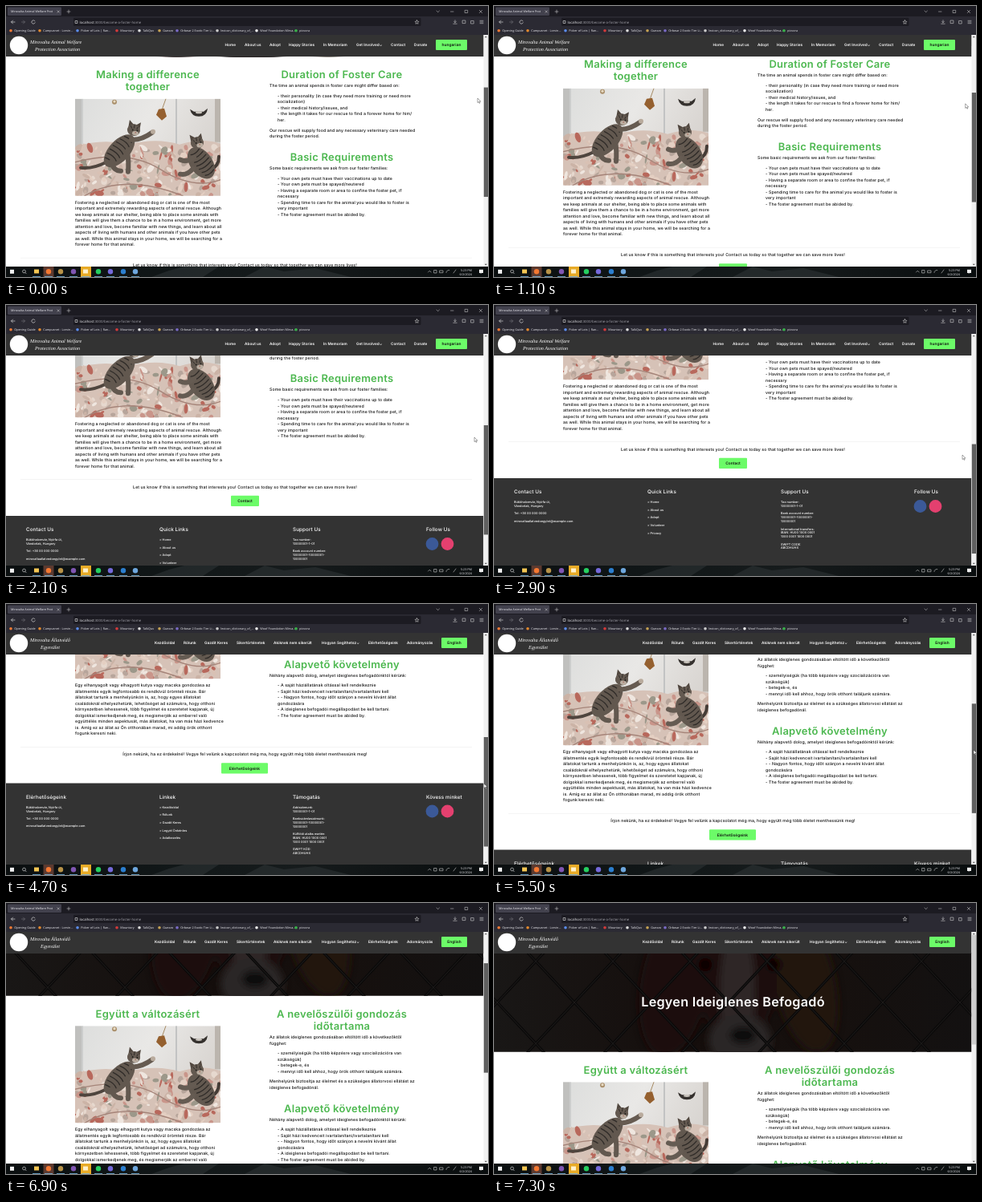
An HTML page for the animation above (7600 ms loop, 600 by 338 pixels).

```html
<!DOCTYPE html>
<html lang="en">
<head>
<meta charset="utf-8">
<title>Foster home page</title>
<style>
html, body { margin: 0; width: 100%; height: 100%; overflow: hidden; background: #fff; }
svg { display: block; width: 100vw; height: 100vh; }
text { font-family: Inter, "Open Sans", sans-serif; font-size: 5.2px; font-weight: 500; letter-spacing: .018em; fill: #111; text-rendering: geometricPrecision; white-space: pre; }
.head { font-size: 13px; font-weight: 600; letter-spacing: .018em; fill: #4db850; }
.title { font-size: 16.2px; font-weight: 600; letter-spacing: .016em; fill: #fff; }
.nav { font-size: 4.7px; font-weight: 600; letter-spacing: .005em; fill: #fff; }
.label { font-size: 4.8px; font-weight: 600; letter-spacing: .01em; }
.foot { font-size: 6.3px; fill: #fff; letter-spacing: .015em; }
.small { font-size: 3.85px; fill: #fff; letter-spacing: 0; }
.brand { font: italic 6.2px "Liberation Serif", serif; letter-spacing: 0; fill: #fff; }
.ui { font: 3.75px "Open Sans", sans-serif; letter-spacing: 0; fill: #f0f0f4; }
.url { font-size: 4.3px; }
.mid { text-anchor: middle; }
.end { text-anchor: end; }
</style>
</head>
<body>
<svg id="stage" viewBox="0 0 600 338" preserveAspectRatio="none"></svg>
<script>
const LOOP = 7600, STEP = 100;
const BUTTON = "#6cfb68";

const rect = (x, y, w, h, fill, more = "") => `<rect x="${x}" y="${y}" width="${w}" height="${h}" fill="${fill}" ${more}/>`;
const disc = (x, y, r, fill, more = "") => `<circle cx="${x}" cy="${y}" r="${r}" fill="${fill}" ${more}/>`;
const oval = (x, y, rx, ry, fill, turn = 0) =>
  `<ellipse rx="${rx}" ry="${ry}" fill="${fill}" transform="translate(${x} ${y}) rotate(${turn})"/>`;
const line = (d, color, width = .6) =>
  `<path d="${d}" fill="none" stroke="${color}" stroke-width="${width}" stroke-linecap="round"/>`;
const text = (x, y, s, cls = "") => `<text x="${x}" y="${y}" class="${cls}">${s.replace(/>/g, "&gt;")}</text>`;
const lines = (x, y, rows, cls = "", pitch = 7.5) =>
  rows.split("\n").map((s, i) => text(x, y + i * pitch, s, cls)).join("");

function randomizer(seed) {
  return () => (seed = (seed * 16807) % 2147483647) / 2147483647;
}

const english = {
  nav: [[272.5, "Home"], [297, "About us"], [328, "Adopt"], [352, "Happy Stories"], [395, "In Memoriam"],
    [436, "Get Involved⌄"], [479, "Contact"], [508, "Donate"]],
  brand: [[30, "Mirovalta Animal Welfare"], [36, "Protection Association"]],
  toggle: [535, "hungarian"],
  title: "Become a Foster Home",
  photoTop: 238.3,
  endTop: 436.5,
  leftHead: "Making a difference\ntogether",
  story: `Fostering a neglected or abandoned dog or cat is one of the most
important and extremely rewarding aspects of animal rescue. Although
we keep animals at our shelter, being able to place some animals with
families will give them a chance to be in a home environment, get more
attention and love, become familiar with new things, and learn about all
aspects of living with humans and other animals if you have other pets
as well. While this animal stays in your home, we will be searching for a
forever home for that animal.`,
  rightHead: "Duration of Foster Care",
  secondHead: [315.4, "Basic Requirements"],
  right: [[328, 223.9, "The time an animal spends in foster care might differ based on:"],
    [338, 236.4, `- their personality (in case they need more training or need more
socialization)
- their medical history/issues, and
- the length it takes for our rescue to find a forever home for him/
her.`],
    [328, 279.4, "Our rescue will supply food and any necessary veterinary care needed\nduring the foster period."],
    [328, 326.4, "Some basic requirements we ask from our foster families:"],
    [338, 339.2, `- Your own pets must have their vaccinations up to date
- Your own pets must be spayed/neutered
- Having a separate room or area to confine the foster pet, if
necessary
- Spending time to care for the animal you would like to foster is
very important
- The foster agreement must be abided by.`]],
  call: "Let us know if this is something that interests you! Contact us today so that together we can save more lives!",
  button: [280, 35, "Contact"],
  foot: ["Contact Us", "Quick Links", "Support Us", "Follow Us"],
  links: ["Home", "About us", "Adopt", "Volunteer", "Privacy"],
  support: ["Tax number:", "Bank account number:", "International transfers:", "SWIFT CODE:"]
};

const hungarian = {
  nav: [[185, "Kezdőoldal"], [221, "Rólunk"], [247, "Gazdit Keres"], [287, "Sikertörténetek"],
    [333, "Akiknek nem sikerült"], [393, "Hogyan Segíthetsz⌄"], [451, "Elérhetőségeink"], [499, "Adományozás"]],
  brand: [[30, "Mirovalta Állatvédő"], [43, "Egyesület"]],
  toggle: [542, "English"],
  title: "Legyen Ideiglenes Befogadó",
  photoTop: 223.3,
  endTop: 429,
  leftHead: "Együtt a változásért",
  story: `Egy elhanyagolt vagy elhagyott kutya vagy macska gondozása az
állatmentés egyik legfontosabb és rendkívül örömteli része. Bár
állatokat tartunk a menhelyünkön is, az, hogy egyes állatokat
családoknál elhelyezhetünk, lehetőséget ad számukra, hogy otthoni
környezetben lehessenek, több figyelmet és szeretetet kapjanak, új
dolgokkal ismerkedjenek meg, és megismerjék az emberrel való
együttélés minden aspektusát, más állatokat, ha van más házi kedvence
is. Amíg ez az állat az Ön otthonában marad, mi addig örök otthont
fogunk keresni neki.`,
  rightHead: "A nevelőszülői gondozás\nidőtartama",
  secondHead: [331, "Alapvető követelmény"],
  right: [[328, 239, "Az állatok ideiglenes gondozásában eltöltött idő a következőktől\nfügghet:"],
    [338, 259, `- személyiségük (ha több képzésre vagy szocializációra van
szükségük)
- betegek-e, és
- mennyi idő kell ahhoz, hogy örök otthont találjunk számára.`],
    [328, 294.3, "Menhelyünk biztosítja az élelmet és a szükséges állatorvosi ellátást az\nideiglenes befogadónál."],
    [328, 341.5, "Néhány alapvető dolog, amelyet ideiglenes befogadóinktól kérünk:"],
    [338, 354, `- A saját háziállatának oltással kell rendelkeznie
- Saját házi kedvenceit ivartalanítani/ivartalanítani kell
- - Nagyon fontos, hogy időt szánjon a nevelni kívánt állat
gondozására
- A ideiglenes befogadói megállapodást be kell tartani.
- The foster agreement must be abided by.`]],
  call: "Írjon nekünk, ha ez érdekelné! Vegye fel velünk a kapcsolatot még ma, hogy együtt még több életet menthessünk meg!",
  button: [268, 58, "Elérhetőségeink"],
  foot: ["Elérhetőségeink", "Linkek", "Támogatás", "Kövess minket"],
  links: ["Kezdőoldal", "Rólunk", "Gazdit Keres", "Legyél Önkéntes", "Adatkezelés"],
  support: ["Adószámunk:", "Bankszámlaszámunk:", "Külföldi utalás esetén:", "SWIFT KÓD:"]
};

function tabby(x, y, turn, rx, ry) {
  let stripes = "";
  for (let k = -3; k <= 3; k++) {
    const sx = k * rx / 4.2, sy = ry * Math.sqrt(1 - (sx / rx) ** 2) * .8;
    stripes += line(`M${sx} ${-sy}Q${sx + 3} 0 ${sx} ${sy * .6}`, "#2f2b28", 1.3);
  }
  return `<g transform="translate(${x} ${y}) rotate(${turn})">${oval(0, 0, rx, ry, "#62584f")}${stripes}</g>`;
}

function catHead(x, y, turn) {
  return `<g transform="translate(${x} ${y}) rotate(${turn}) scale(.9)">
    <path d="M-8 -3L-8 -13L-2 -8L3 -8L8 -12L8 -2Z" fill="#51473f"/>${oval(0, 0, 9, 8, "#635950")}
    ${oval(3, 4, 4.5, 3, "#b9ada0")}${line("M-5 -5L-3 -2M0 -7L0 -3M5 -5L4 -2", "#2f2b28", 1)}
    ${disc(-1.5, 0, 1.1, "#24221e")}${disc(5, 0, 1.1, "#24221e")}${disc(3, 3, .9, "#a66d60")}</g>`;
}

function photo(y) {
  const rnd = randomizer(41);
  const tones = ["#c9958a", "#e6d8ce", "#cbb3a6", "#efe6df", "#b8685c", "#9c988a", "#d9c1b4", "#b7a59b", "#e4cfc2"];
  let quilt = "";
  for (let i = 0; i < 230; i++) {
    const px = rnd() * 185, py = 60 + rnd() * 62;
    quilt += oval(px, py, 1.5 + rnd() * 5, 1 + rnd() * 3, tones[Math.floor(rnd() * tones.length)], rnd() * 180);
  }
  return `<svg x="86" y="${y}" width="181" height="121" viewBox="0 0 181 121">
    ${rect(0, 0, 181, 121, "url(#wall)")}
    ${rect(0, 0, 8, 62, "#c0c0be")}${rect(125, 0, 2, 60, "#c2c3c3")}${line("M9 0V56", "#b9bbbb", 1)}
    ${disc(49, 4, 3, "#a98e69")}${disc(49, 3.4, 1.6, "#e6dac3")}
    ${line("M113 0L108 14", "#a58a63", 1)}<path d="M104 13L111 12L114 22L108 27L101 20Z" fill="#95602f"/>
    <path d="M143 13L148 16H160L165 12Q164 22 154 22Q145 22 143 13Z" fill="#35312e"/>${oval(154, 17, 4, 1.6, "#c9c4bd")}
    ${rect(174, 0, 7, 54, "#bbb5ae")}
    <path d="M0 60Q34 49 65 57Q102 48 130 57Q158 48 181 56V121H0Z" fill="#d6c2b7"/>${quilt}
    ${line("M0 79Q65 62 106 88T181 101M12 121Q61 92 134 121", "#a58479", 1.4)}
    ${line("M39 79Q21 88 7 86", "#4f453e", 4)}
    ${tabby(55, 65, -48, 25, 13)}${line("M45 79Q48 90 57 90M65 65Q67 80 66 91", "#62584f", 6)}
    ${line("M70 51Q82 52 96 42", "#665b51", 6)}${disc(97, 41, 3, "#b9ab9d")}${catHead(73, 39, 10)}
    ${line("M169 88Q179 84 179 72", "#453c36", 4)}
    ${tabby(157, 80, 55, 22, 14)}${line("M148 73Q139 80 131 76M147 87Q139 96 131 94", "#655b52", 6)}
    ${catHead(152, 55, -12)}
  </svg>`;
}

function hero(title) {
  let wire = "";
  for (let x = -150; x < 640; x += 96) wire += `M${x} 186L${x + 116} 62M${x} 62L${x + 116} 186`;
  return `<svg x="0" y="62" width="594.5" height="123.7" viewBox="0 62 594.5 123.7">
    ${rect(0, 62, 595, 124, "url(#heroTone)")}
    <g filter="url(#soft)">
      ${oval(225, 100, 42, 92, "#1f110d", 10)}${oval(387, 100, 38, 88, "#20120e", -12)}
      ${oval(302, 92, 50, 80, "#1b100d")}${oval(303, 112, 22, 84, "#2e2826")}${oval(306, 171, 39, 32, "#2c2725")}
      ${oval(310, 165, 17, 11, "#0c0a0a")}${disc(263, 77, 9, "#080606")}${disc(348, 77, 9, "#080606")}
    </g>
    ${line(wire, "#0b0a0a", 3.5)}${line(wire, "#211f1e", .9)}</svg>${text(297.5, 128.5, title, "title mid")}`;
}

function footer(p, top) {
  const xs = [25, 191, 357, 523];
  const small = (x, y, rows) => lines(x, top + y, rows, "small", 4.8);
  const [tax, bank, abroad, swift] = p.support;
  return rect(0, top, 594.5, 240, "#333") +
    xs.map((x, i) => text(x, top + 19.2, p.foot[i], "foot")).join("") +
    small(25, 31.2, "Bükkhalomvár, Nyírfa út,\nVándorlak, Hungary") + small(25, 45.4, "Tel: +36 00 000 0000") +
    small(25, 54.7, "mirovaltaallatvedoegylet@example.com") +
    p.links.map((s, i) => small(191, 31.2 + i * 9.6, "> " + s)).join("") +
    small(357, 31.2, tax + "\n10000001-1-01") + small(357, 45.4, bank + "\n10000001-10000001-\n10000001") +
    small(357, 64.6, abroad + "\nIBAN: HU00 1000 0001\n1000 0001 1000 0001") +
    small(357, 83.6, swift + "\nABCDHUHX") +
    disc(530.5, top + 35, 7.9, "#3b5998") + disc(549.5, top + 35, 7.9, "#e4406f");
}

function page(p) {
  const [bx, bw, label] = p.button, end = p.endTop;
  return hero(p.title) + lines(176.5, 212.7, p.leftHead, "head mid", 15) + photo(p.photoTop) +
    lines(86, p.photoTop + 131, p.story) + lines(418, 212.7, p.rightHead, "head mid", 15) +
    text(418, p.secondHead[0], p.secondHead[1], "head mid") +
    p.right.map(([x, y, rows]) => lines(x, y, rows)).join("") +
    rect(18, end, 562, .4, "#e4e4e4") + text(297.5, end + 11.1, p.call, "mid") +
    rect(bx, end + 20.3, bw, 13.3, BUTTON, 'rx="1"') + text(bx + bw / 2, end + 28.7, label, "label mid") +
    footer(p, end + 45.5);
}

function navBar(p) {
  const [x, label] = p.toggle;
  return p.nav.map(([nx, s]) => text(nx, 50.2, s, "nav")).join("") +
    p.brand.map(([nx, s], i) => text(nx, 47 + i * 9, s, "brand")).join("") +
    rect(x, 42, 574 - x, 13, BUTTON, 'rx="1"') + text((x + 574) / 2, 50.2, label, "label mid");
}

function browserTop() {
  const marks = [[5, "Opening Guide", "#f47b35"], [41, "Campusnet - Lorvin…", "#e58a2c"],
    [88, "Picker of Lots | Ran…", "#5b8def"], [137, "Mountory", "#d63a3a"], [165, "TalkQuv", "#ddd"],
    [190, "Guezzo", "#c5a253"], [212, "Orbwar 2 Exotic Tier Li…", "#7b6bc9"], [262, "lexicon_dictionary_of_…", "#ccc"],
    [311, "Woof Foundation Mirva…", "#eee"], [360, "picvora", "#39b54a"]];
  return rect(0, 0, 600, 13, "#1c1b22") + rect(0, 13, 600, 23, "#2b2a33") +
    rect(2, 1.5, 67, 10.5, "#42414d", 'rx="1.3"') + text(6, 8.2, "Mirovalta Animal Welfare Prot", "ui") +
    line("M64 5.8l2.4 2.4m0 -2.4l-2.4 2.4M76 7h4M78 5v4M536 6l1.7 1.7l1.7 -1.7M553.5 7h3.5M589.3 5.3l3.3 3.3m0 -3.3l-3.3 3.3M571.5 5.3h3.2v3.2h-3.2z", "#ddd", .5) +
    rect(84, 14.7, 432.5, 10.4, "#1c1b22", 'rx="1.3"') +
    `<text x="91.5" y="21.6" class="ui url">localhost:<tspan fill="#a5a5ad">3000/become-a-foster-home</tspan></text>` +
    line("M11 20H6.5l2 -2m-2 2l2 2M36 18.8a2.2 2.2 0 1 0 .2 2M86.5 18.5h2.4v3h-2.4z", "#eee", .6) +
    line("M19.5 20h4l-2 -2m2 2l-2 2", "#77767f", .6) +
    line("M511.5 17.7l.7 1.5l1.7 .2l-1.2 1.2l.3 1.7l-1.5 -.8l-1.5 .8l.3 -1.7l-1.2 -1.2l1.7 -.2zM559 17.7v3l-1.4 -1.3m1.4 1.3l1.4 -1.3M556.8 22.2h4.4M568.5 18h3.4v3.6h-3.4zM579 18.5h3.2v3.5h-3.2zM590 18.3h4M590 20h4M590 21.7h4", "#ddd", .55) +
    marks.map(([x, s, c]) => disc(x + 1, 30.7, 1.8, c) + text(x + 5.3, 32.1, s, "ui")).join("");
}

function taskbar() {
  const icons = [[38, "#f3c653"], [53, "#f47832"], [68, "#b89348"], [84, "#8056b3"], [99, "#f2b72f"],
    [115, "#25cf60"], [130, "#7569db"], [146, "#2b7fd0"], [161, "#6ea7de"]];
  return rect(0, 325, 600, 13, "url(#barTone)") +
    `<path d="M181 338L203 330L222 325H265L245 338ZM322 325L346 331L385 327L429 338H297Z" fill="#33393a" opacity=".5"/>` +
    rect(5, 328.8, 5, 5, "#f0f0f0") + disc(22.5, 331, 1.9, "none", 'stroke="#eee" stroke-width=".6"') +
    line("M24 332.6l1.2 1.2", "#eee") + rect(46.5, 325, 13, 13, "#5c3a30") + rect(93, 325, 13, 13, "#e8ab27") +
    icons.map(([x, c], i) => (i === 0 || i === 4 ? rect(x - 3, 328.5, 6, 5, i ? "#fff1cc" : c) : disc(x, 331.2, 3.2, c)) +
      rect(x - 5, 337, 10, .8, "#78b8e3")).join("") +
    line("M525.5 332l1.8 -1.8l1.8 1.8M533 329.5h3v3.5h-3zM540 330h4v2.7h-4zM548 332.5a3 3 0 0 1 3.8 -3M557 333l3 -4", "#ddd", .55) +
    `<path d="M589 328.8h5v4.2h-2.2l-1 1.2v-1.2h-1.8z" fill="#eee"/>` +
    text(580, 330.5, "5:23 PM", "ui end") + text(580, 336.2, "6/2/2024", "ui end");
}

const stage = document.getElementById("stage");
stage.innerHTML = `
  <defs>
    <linearGradient id="wall" x2="1" y2=".4"><stop stop-color="#dcdddc"/><stop offset=".5" stop-color="#e9e8e6"/><stop offset="1" stop-color="#d7d3cf"/></linearGradient>
    <linearGradient id="heroTone"><stop stop-color="#191716"/><stop offset=".4" stop-color="#150e0c"/><stop offset=".7" stop-color="#16100e"/><stop offset="1" stop-color="#131111"/></linearGradient>
    <linearGradient id="barTone"><stop stop-color="#0b0f10"/><stop offset=".35" stop-color="#111718"/><stop offset=".6" stop-color="#161b1c"/><stop offset="1" stop-color="#090d0e"/></linearGradient>
    <filter id="soft"><feGaussianBlur stdDeviation="5"/></filter>
    <clipPath id="view"><rect y="36" width="594.5" height="289"/></clipPath>
  </defs>
  ${rect(0, 0, 600, 338, "#fff")}
  <g clip-path="url(#view)"><g id="scroller"><g id="enPage">${page(english)}</g><g id="huPage">${page(hungarian)}</g></g></g>
  ${rect(0, 36, 594.5, 27, "#333")}${disc(16, 49, 11.2, "#fff")}
  <g id="enNav">${navBar(english)}</g><g id="huNav">${navBar(hungarian)}</g>
  ${rect(594.5, 36, 5.5, 289, "#f1f1f1")}
  <path d="M595.8 39.2l1.5 -1.6l1.5 1.6zM595.8 321.8l1.5 1.6l1.5 -1.6z" fill="#505050"/>
  ${rect(594.8, 40, 5.2, 136.5, "#606060", 'id="thumb"')}
  ${browserTop()}${taskbar()}
  <path id="cursor" d="M0 0V5.6L1.3 4.4L2.2 6.4L3.1 6L2.2 4.1H4Z" fill="#fff" stroke="#222" stroke-width=".4"/>`;

// Each key is a time followed by the values reached at that time.
const scrollKeys = [[0, 122.6], [900, 122.6], [1600, 168], [2100, 219], [2500, 249], [2900, 266], [3800, 266],
  [3900, 251], [4900, 251], [5200, 218], [5500, 168], [5800, 142], [6400, 142], [6500, 140], [6700, 112],
  [7100, 28], [7300, 0], [LOOP, 0]];
const cursorKeys = [[0, 587, 115], [900, 587, 115], [1600, 586, 139], [2100, 583, 165], [2500, 583, 179],
  [2900, 583, 187], [3300, 576, 125], [3700, 555, 48], [4200, 555, 48], [4400, 577, 125], [4600, 595, 224],
  [4900, 595, 224], [5200, 596, 207], [5500, 597, 182], [5800, 599, 170], [6500, 599, 169], [7300, 606, 99], [LOOP, 606, 99]];
const SWITCH = 3900;
const isDragging = t => t < 3000 || (t >= 4600 && t < 7300);

function at(keys, t) {
  const i = Math.max(1, keys.findIndex(k => k[0] >= t));
  const a = keys[i - 1], b = keys[i], u = (t - a[0]) / (b[0] - a[0]);
  return a.slice(1).map((v, n) => v + (b[n + 1] - v) * u);
}

const el = id => document.getElementById(id);
const parts = { scroller: el("scroller"), thumb: el("thumb"), cursor: el("cursor") };
const views = [[el("enPage"), false], [el("enNav"), false], [el("huPage"), true], [el("huNav"), true]];

function draw(time) {
  const t = Math.floor((time % LOOP) / STEP) * STEP;
  const [scroll] = at(scrollKeys, t), [x, y] = at(cursorKeys, t);
  views.forEach(([node, hu]) => { node.style.display = hu === (t >= SWITCH) ? "" : "none"; });
  parts.scroller.setAttribute("transform", `translate(0 ${-scroll})`);
  parts.thumb.setAttribute("y", 40 + scroll * .502);
  parts.thumb.setAttribute("fill", isDragging(t) ? "#606060" : "#cdcdcd");
  parts.cursor.setAttribute("transform", `translate(${x} ${y})`);
}

const start = performance.now();
function tick() {
  draw(performance.now() - start);
  requestAnimationFrame(tick);
}
tick();
</script>
</body>
</html>
```
